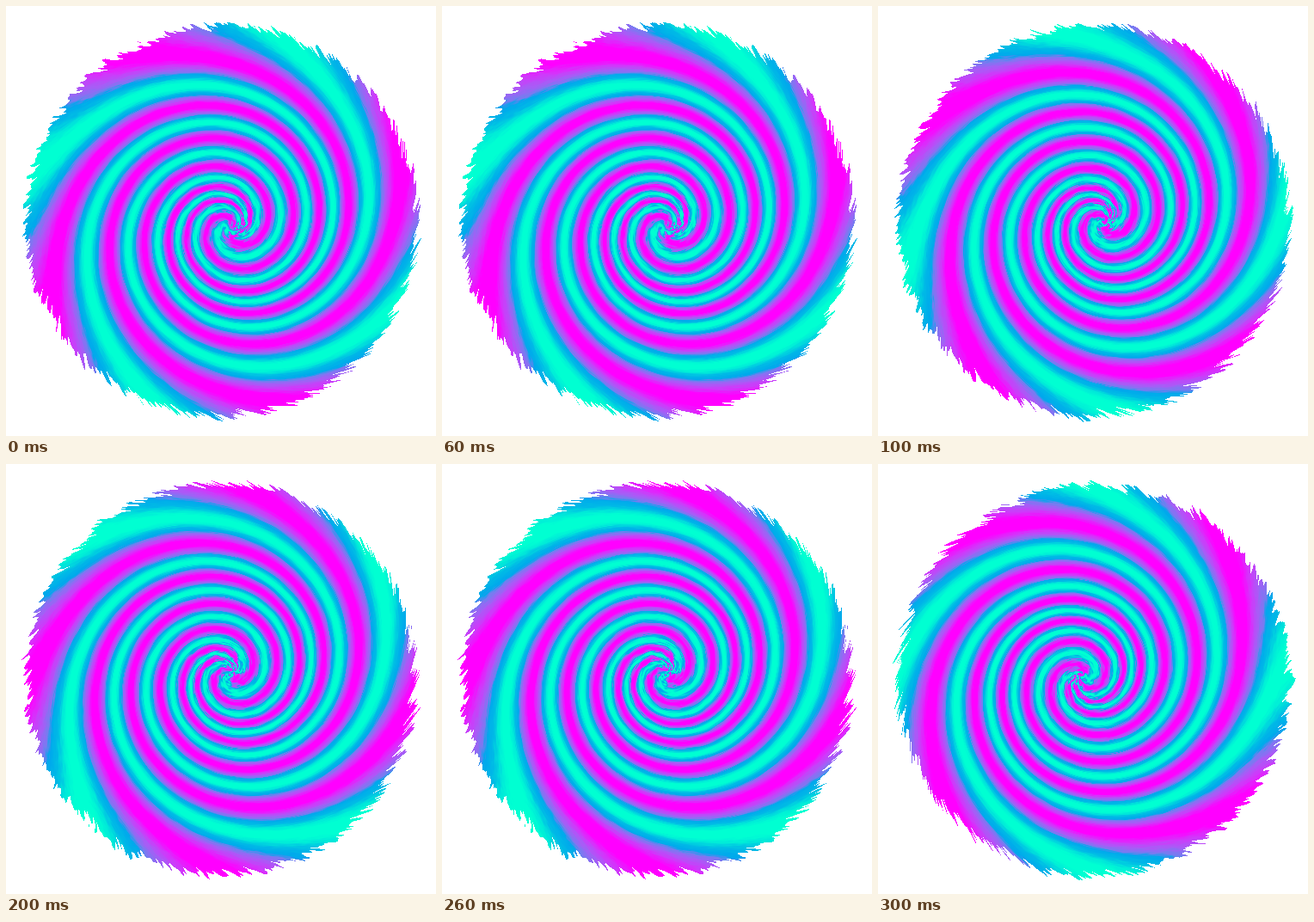
Recreate the animation shown at these times as an HTML page with a canvas. Size 500 by 500 pixels, loop 400 ms.

```html
<!DOCTYPE html>
<html lang="en">
<head>
<meta charset="utf-8">
<title>Whirl</title>
<style>
  html, body { margin: 0; width: 100%; height: 100%; overflow: hidden; background: #fff; }
  canvas { display: block; width: 500px; height: 500px; }
</style>
</head>
<body>
<canvas id="stage" width="500" height="500"></canvas>
<script>
const SIZE = 500, MID = 250, STEP_MS = 100, RIM = 227;
const QUARTER = Math.PI / 2, TWIST = 6.5, REACH = 250;
const ctx = document.getElementById('stage').getContext('2d');

// turn: arm rotation in quarter turns, eye: centre of the whirl
const poses = [
  { turn: 0.345, eye: [260, 256] },
  { turn: 0.67,  eye: [260, 250] },
  { turn: 0.035, eye: [258, 244] },
  { turn: 0.575, eye: [240, 250] }
];

// Colour by distance from the middle of a magenta arm (0) to a cyan one (0.5)
const stops = [
  [0, 255, 0, 255], [0.07, 255, 0, 255], [0.14, 208, 56, 250], [0.2, 168, 92, 246],
  [0.25, 118, 124, 240], [0.28, 0, 168, 236], [0.34, 0, 186, 230], [0.4, 0, 236, 216],
  [0.45, 0, 255, 210], [0.5, 0, 255, 210]
];

const mix = (a, b, t) => a + (b - a) * t;
const ease = t => t * t * (3 - 2 * t);

function armColor(d) {
  let i = 1;
  while (i < stops.length - 1 && d > stops[i][0]) i++;
  const a = stops[i - 1], b = stops[i], t = (d - a[0]) / (b[0] - a[0]);
  return [1, 2, 3].map(k => mix(a[k], b[k], t));
}
const palette = Array.from({ length: 257 }, (_, i) => armColor(i / 512));

function hash(x, y, seed) {
  let h = Math.imul(x, 374761393) + Math.imul(y, 668265263) + Math.imul(seed, 974634777);
  h = Math.imul(h ^ (h >>> 13), 1274126177);
  return ((h ^ (h >>> 16)) >>> 0) / 4294967296;
}

function noise(x, y, seed) {
  const i = Math.floor(x), j = Math.floor(y), u = ease(x - i), v = ease(y - j);
  return mix(
    mix(hash(i, j, seed), hash(i + 1, j, seed), u),
    mix(hash(i, j + 1, seed), hash(i + 1, j + 1, seed), u), v) - 0.5;
}

// Maps a stage point back to the flat disc, relative to the disc's middle
function unwhirl(x, y, [ex, ey]) {
  const dx = x - ex, dy = y - ey, r = Math.hypot(dx, dy);
  const angle = Math.atan2(dy, dx) - TWIST * QUARTER * (1 - r / REACH) ** 2;
  return [ex - MID + r * Math.cos(angle), ey - MID + r * Math.sin(angle)];
}

function render({ turn, eye }, seed) {
  const image = ctx.createImageData(SIZE, SIZE);
  for (let y = 0; y < SIZE; y++) {
    for (let x = 0; x < SIZE; x++) {
      const [fx, fy] = unwhirl(x, y, eye);
      const r = Math.hypot(fx, fy);
      if (r > 240) continue;
      const spoke = Math.atan2(fy, fx);
      const fray = 11 * noise(spoke * 90, r / 10, seed) + 9 * noise(spoke * 34, r / 14, seed + 9);
      if (r + fray > RIM) continue;

      // Rough grain on the flat disc is sheared into streaks by the whirl
      const gx = fx + 9 * noise(fx / 3, fy / 3, seed + 20);
      const gy = fy + 9 * noise(fx / 3, fy / 3, seed + 30);
      const phase = -Math.atan2(gy, gx) / QUARTER - turn;
      const d = Math.abs(phase - Math.round(phase));
      image.data.set([...palette[Math.round(d * 512)], 255], (y * SIZE + x) * 4);
    }
  }
  return image;
}

const images = poses.map((pose, i) => render(pose, i + 1));
const start = performance.now();
let shown = -1;

function draw(now) {
  const index = Math.floor(Math.max(0, now - start) / STEP_MS) % images.length;
  if (index !== shown) ctx.putImageData(images[shown = index], 0, 0);
  requestAnimationFrame(draw);
}
draw(start);
</script>
</body>
</html>
```
